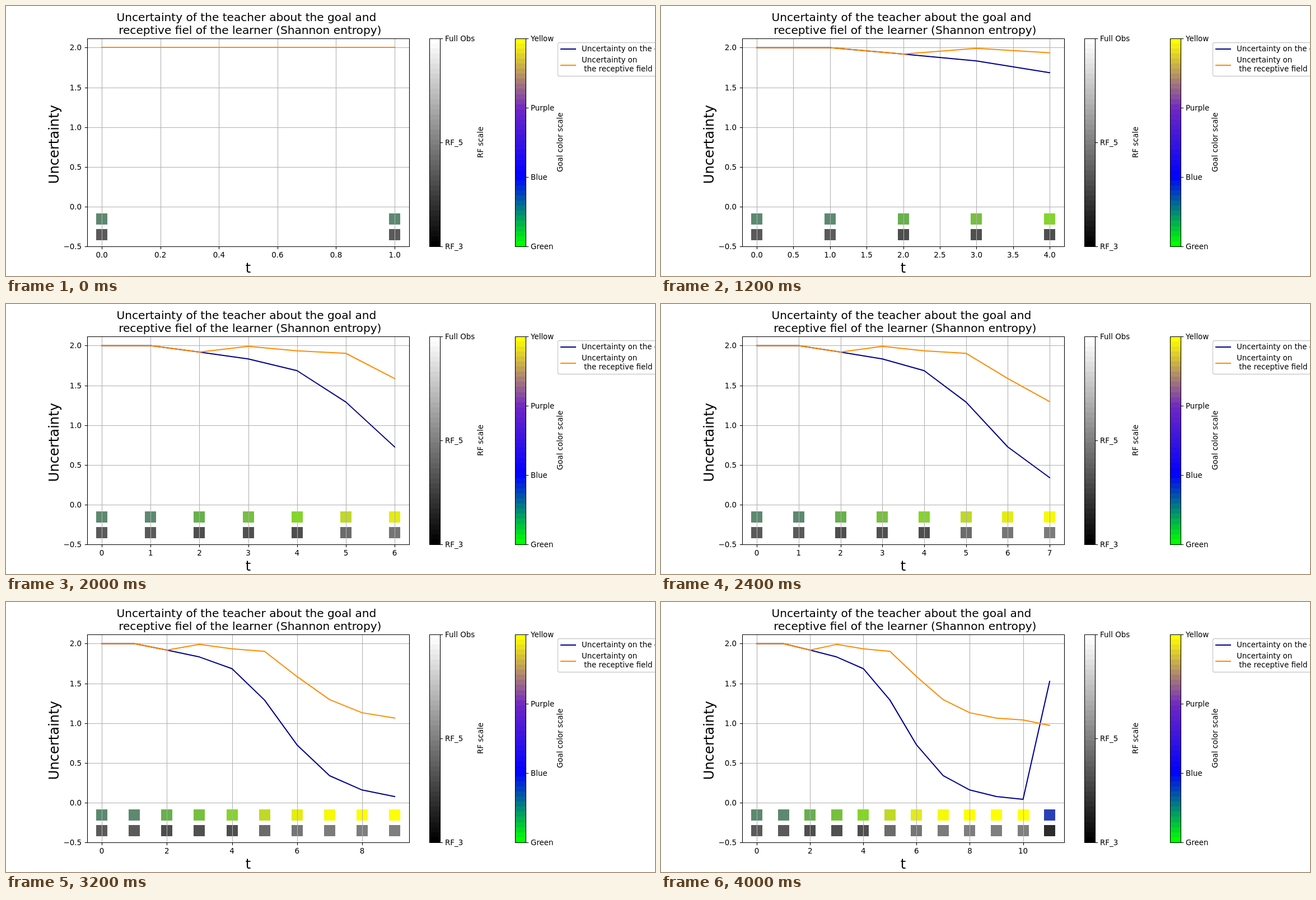
Write an HTML page with a canvas that moves like this. It is 1159 by 483 pixels and loops after 4400 ms.

```html
<!DOCTYPE html>
<html lang="en">
<head>
<meta charset="utf-8">
<title>Uncertainty over time</title>
<style>
  html, body { margin: 0; width: 100%; height: 100%; overflow: hidden; background: #fff; }
  canvas { display: block; }
</style>
</head>
<body>
<canvas id="stage" width="1159" height="483"></canvas>
<script>
const ctx = document.getElementById('stage').getContext('2d');
const W = 1159, H = 483, STEP_MS = 400, STEPS = 11;

// A 12 x 5 inch figure; the layout follows from its resolution.
const DPI = 96.65, FIG_W = 12 * DPI, FIG_H = 5 * DPI;
const pt = n => n * DPI / 72;
const LEFT = FIG_W * 0.125, RIGHT = FIG_W * 0.621;
const TOP = H - FIG_H * 0.88, BOTTOM = H - FIG_H * 0.11;
const X_MIN = LEFT + (RIGHT - LEFT) / 22, X_MAX = RIGHT - (RIGHT - LEFT) / 22;
const UNIT_Y = (BOTTOM - TOP) / 2.6175;
const MID_X = (LEFT + RIGHT) / 2, MID_Y = (TOP + BOTTOM) / 2;
const GRAY_BAR_X = FIG_W * 0.652, GOAL_BAR_X = FIG_W * 0.78375;

const NAVY = '#00008b', ORANGE = '#ff8c00', GRID = '#b0b0b0';
const FONT = '"DejaVu Sans", sans-serif';
const SMALL = pt(10), TITLE = pt(15), LARGE = pt(18);
const THIN = pt(0.8), CURVE = pt(1.5), TICK = pt(3.5);

const goalEntropy = [2, 2, 1.918, 1.832, 1.685, 1.29, 0.725, 0.338, 0.158, 0.075, 0.04, 1.525];
const fieldEntropy = [2, 2, 1.918, 1.99, 1.935, 1.903, 1.585, 1.295, 1.13, 1.063, 1.04, 0.97];
const goalColors = ['#5c8970', '#5c8970', '#68b04d', '#76c03e', '#85d42b', '#c0d926',
  '#e4ec12', '#f6f907', '#fdfd03', '#fefe01', '#ffff00', '#2b3fb8'];
const fieldGrays = [90, 90, 78, 80, 78, 107, 117, 123, 126, 127, 127, 44];

const goalScale = [[0, 255, 0], [0, 0, 255], [112, 39, 195], [255, 255, 0]];
const grayScale = [[0, 0, 0], [255, 255, 255]];

const yAt = v => BOTTOM - (v + 0.5) * UNIT_Y;
const snap = v => Math.floor(v + 0.5) + 0.5;

function text(str, x, y, size = SMALL, align = 'left', angle = 0) {
  ctx.save();
  ctx.translate(x, y);
  ctx.rotate(angle);
  ctx.font = `${size}px ${FONT}`;
  ctx.textAlign = align;
  ctx.fillStyle = '#000';
  ctx.fillText(str, 0, 0);
  ctx.restore();
}

function polyline(points, color, width, cap = 'butt') {
  ctx.beginPath();
  points.forEach(([x, y]) => ctx.lineTo(x, y));
  ctx.strokeStyle = color;
  ctx.lineWidth = width;
  ctx.lineCap = cap;
  ctx.stroke();
}

function frame(x0, x1) {
  ctx.strokeStyle = '#000';
  ctx.lineWidth = THIN;
  ctx.strokeRect(snap(x0), snap(TOP), snap(x1) - snap(x0), snap(BOTTOM) - snap(TOP));
}

function mix(stops, p) {
  const pos = p * (stops.length - 1);
  const i = Math.min(Math.floor(pos), stops.length - 2);
  const rgb = stops[i].map((c, k) => Math.round(c + (stops[i + 1][k] - c) * (pos - i)));
  return `rgb(${rgb})`;
}

function colorBar(x, stops, labels, title, titleX) {
  const height = BOTTOM - TOP, right = x + height / 20, bands = 41;
  for (let i = 0; i < bands; i++) {
    const y0 = Math.round(BOTTOM - height * (i + 1) / bands);
    const y1 = Math.round(BOTTOM - height * i / bands);
    ctx.fillStyle = mix(stops, i / (bands - 1));
    ctx.fillRect(snap(x), y0, snap(right) - snap(x), y1 - y0);
  }
  frame(x, right);
  labels.forEach((label, i) => {
    const y = BOTTOM - height * i / (labels.length - 1);
    const edge = snap(right);
    polyline([[edge, snap(y)], [edge + TICK, snap(y)]], '#000', THIN);
    text(label, Math.round(right + 2 * TICK), Math.round(y + 5));
  });
  text(title, titleX, MID_Y, SMALL, 'center', -Math.PI / 2);
}

function legend() {
  ctx.beginPath();
  ctx.roundRect(985.5, 65.5, 208, 60, 3);
  ctx.strokeStyle = '#ccc';
  ctx.lineWidth = pt(1);
  ctx.stroke();
  polyline([[991, 77], [1017, 77]], NAVY, CURVE, 'square');
  polyline([[991, 106], [1017, 106]], ORANGE, CURVE, 'square');
  text('Uncertainty on the goal', 1028, 81);
  text('Uncertainty on', 1028, 101);
  text(' the receptive field', 1028, 117);
}

function tickStep(last) {
  return [0.2, 0.25, 0.5, 1, 2].find(s => s >= last * 1.1 / 9);
}

function square(x, y, color) {
  ctx.fillStyle = color;
  ctx.fillRect(Math.round(x) - 10, y - 10, 20, 20);
}

function plot(last) {
  const xAt = v => X_MIN + (X_MAX - X_MIN) * v / last;
  for (let i = 0; i <= last; i++) {
    const g = fieldGrays[i];
    square(xAt(i), 381, goalColors[i]);
    square(xAt(i), 409, `rgb(${g},${g},${g})`);
  }

  const step = tickStep(last);
  const digits = step === 0.25 ? 2 : step < 1 ? 1 : 0;
  const floor = snap(BOTTOM), wall = snap(LEFT);
  for (let k = 0; k * step <= last + 1e-6; k++) {
    const x = xAt(k * step), px = snap(x);
    polyline([[px, TOP], [px, BOTTOM]], GRID, THIN);
    polyline([[px, floor], [px, floor + TICK]], '#000', THIN);
    text((k * step).toFixed(digits), x, 450, SMALL, 'center');
  }
  for (let v = -0.5; v <= 2; v += 0.5) {
    const y = yAt(v), py = snap(y);
    polyline([[LEFT, py], [RIGHT, py]], GRID, THIN);
    polyline([[wall - TICK, py], [wall, py]], '#000', THIN);
    text(v.toFixed(1).replace('-', '\u2212'), 135, Math.round(y + 5), SMALL, 'right');
  }

  // A perfectly level line sits on whole pixels.
  const curve = values => values.slice(0, last + 1)
    .map((v, i) => [xAt(i), last === 1 ? Math.round(yAt(v)) : yAt(v)]);
  polyline(curve(goalEntropy), NAVY, CURVE, 'square');
  polyline(curve(fieldEntropy), ORANGE, CURVE, 'square');
  frame(LEFT, RIGHT);
}

function draw(last) {
  ctx.fillStyle = '#fff';
  ctx.fillRect(0, 0, W, H);
  ctx.lineJoin = 'round';
  colorBar(GRAY_BAR_X, grayScale, ['RF_3', 'RF_5', 'Full Obs'], 'RF scale', 852);
  colorBar(GOAL_BAR_X, goalScale, ['Green', 'Blue', 'Purple', 'Yellow'], 'Goal color scale', 994);
  legend();
  plot(last);
  text('Uncertainty of the teacher about the goal and ', MID_X, 27, TITLE, 'center');
  text(' receptive fiel of the learner (Shannon entropy)', MID_X, 50, TITLE, 'center');
  text('Uncertainty ', 94, MID_Y, LARGE, 'center', -Math.PI / 2);
  text('t', MID_X, 477, LARGE, 'center');
}

const start = performance.now();
function tick() {
  const step = Math.floor((performance.now() - start) / STEP_MS) % STEPS;
  draw(step + 1);
  requestAnimationFrame(tick);
}
tick();
</script>
</body>
</html>
```
